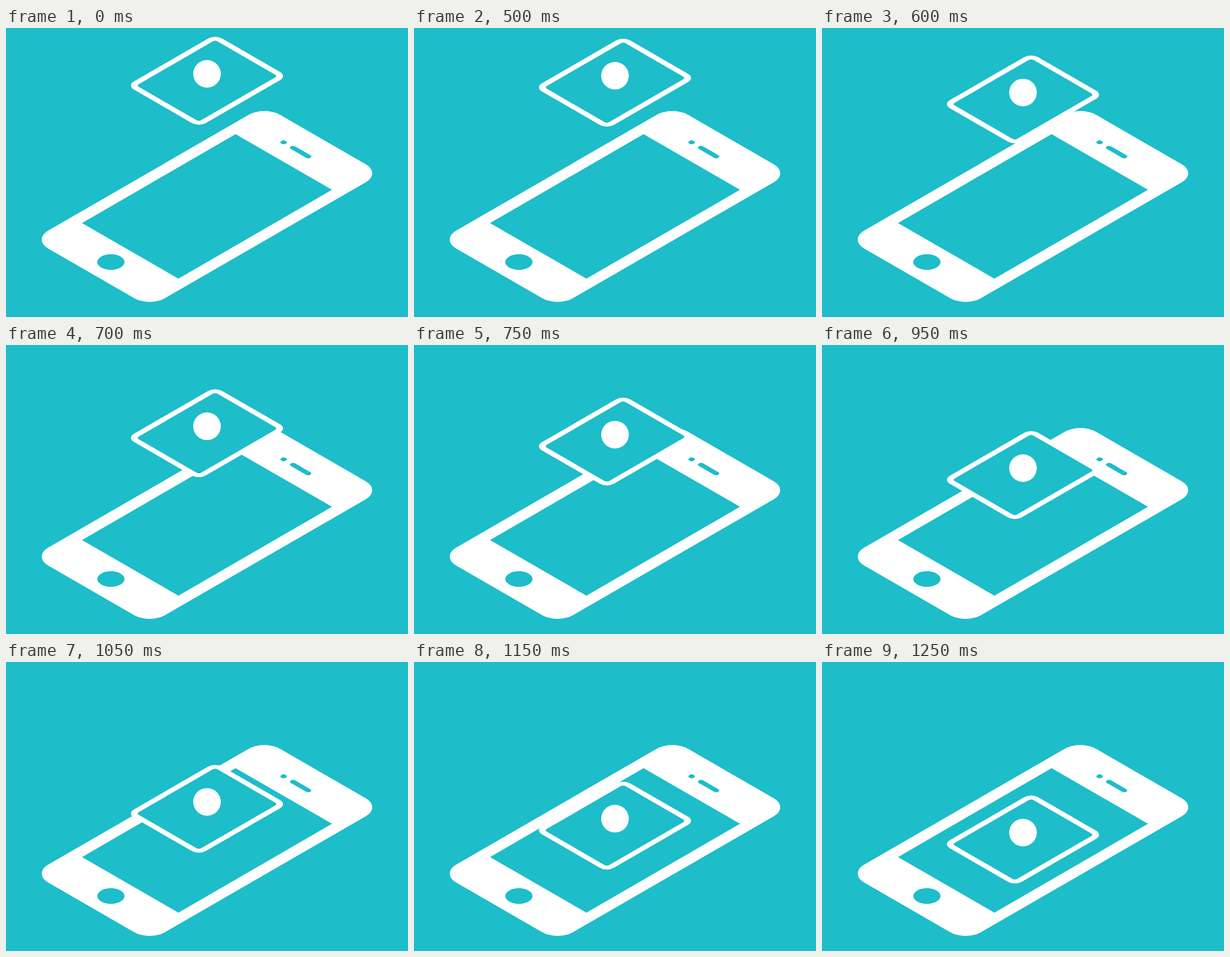
Write an HTML page that moves like this. It is 640x460 px and loops after 2.25 s.

```html
<!DOCTYPE html>
<html lang="en">
<head>
<meta charset="utf-8">
<title>Card landing on a phone</title>
<style>
  html, body { margin: 0; width: 100%; height: 100%; overflow: hidden; background: #1dbdca; }
  svg { display: block; width: 640px; height: 460px; }
  .teal { fill: #1dbdca; }
  .white { fill: #fff; }
</style>
</head>
<body>
<svg viewBox="0 0 640 460">
  <!-- Isometric plane: x runs down-right, y runs up-right -->
  <g transform="matrix(.866 .5 .866 -.5 320 284)">
    <rect class="white" x="-107.5" y="-213" width="215" height="426" rx="28.5"/>
  </g>
  <path class="teal" d="M121 310.5L365.5 169L519 257.5L274.5 399Z"/>
  <g class="teal">
    <circle r="17.7" transform="matrix(.866 .5 .866 -.5 167 372.5)"/>
    <circle r="4.2" transform="matrix(.866 .5 .866 -.5 442 182)"/>
    <rect x="-18" y="-4" width="36" height="8" rx="4" transform="matrix(.866 .5 .866 -.5 469 197.5)"/>
  </g>
  <g id="card">
    <rect class="teal" x="-61.8" y="-76.8" width="123.6" height="153.6" rx="8.6"
      stroke="#fff" stroke-width="8.8" transform="matrix(.866 .5 .866 -.5 320 84)"/>
    <circle class="white" cx="320" cy="73" r="22"/>
  </g>
</svg>
<script>
  const LOOP = 2250, START = 500, STEP = 50, END = 198.5;
  const card = document.getElementById('card');

  // Constant fall in 50 ms steps, stopping on the screen
  function drop(t) {
    if (t < START) return 0;
    return Math.min(END, 3 + Math.floor((t - START) / STEP) * 40 / 3);
  }

  function draw() {
    const t = performance.now() % LOOP;
    card.setAttribute('transform', `translate(0 ${drop(t)})`);
    requestAnimationFrame(draw);
  }
  draw();
</script>
</body>
</html>
```
